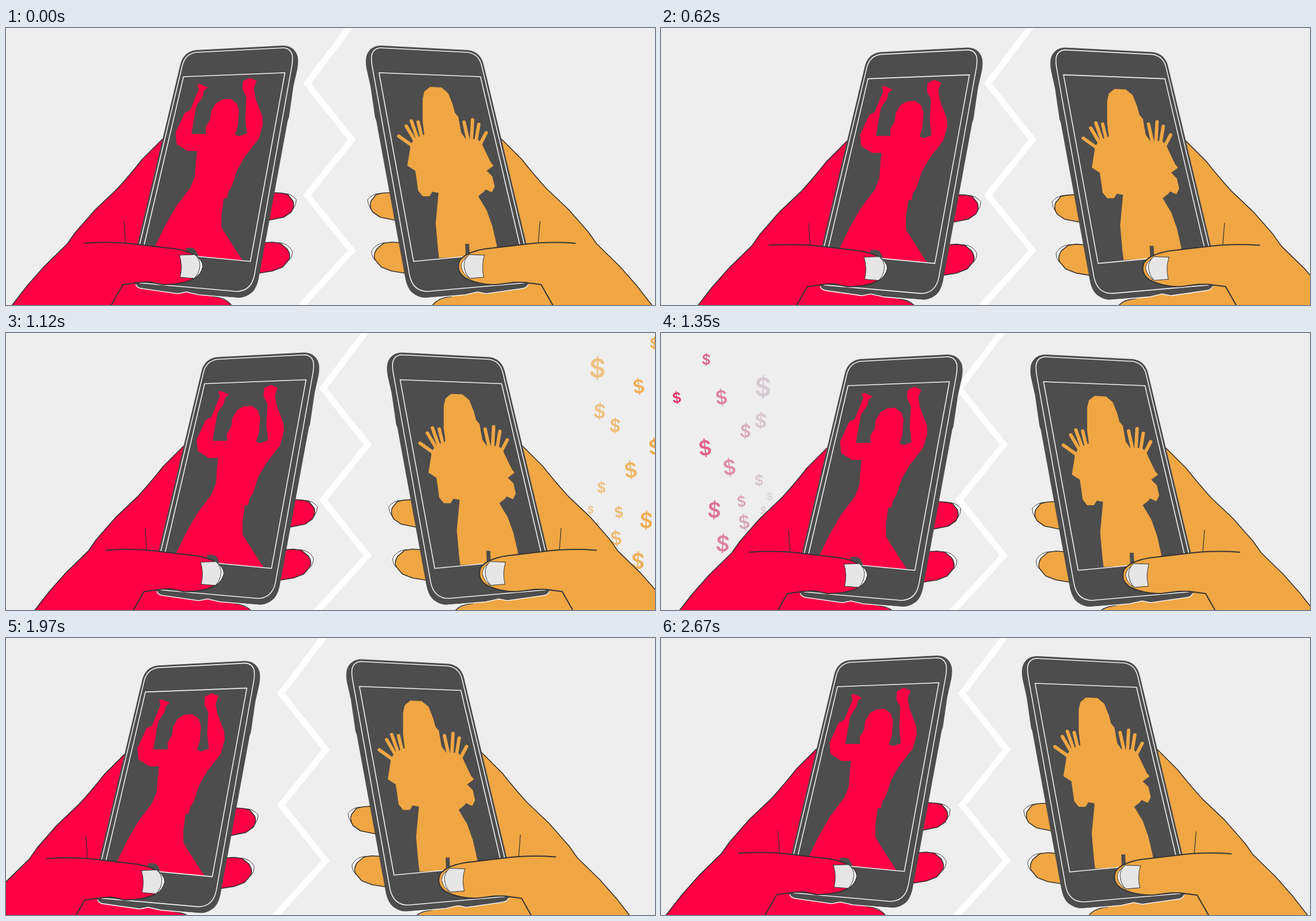
Write an HTML page with a canvas that moves like this. It is 1145 px wide and 489 px high and loops after 2710 ms.

```html
<!DOCTYPE html>
<html lang="en">
<head>
<meta charset="utf-8">
<style>
html, body { margin: 0; width: 100%; height: 100%; overflow: hidden; background: #eee; }
canvas { display: block; }
</style>
</head>
<body>
<canvas id="stage" width="1145" height="489"></canvas>
<script>
const ctx = document.getElementById('stage').getContext('2d');
const LOOP = 2710, MIRROR = 1150;
const RED = '#ff0044', ORANGE = '#f0a643', DARK = '#4d4d4d', INK = '#333', PALE = '#f2f2f2';
const path = d => new Path2D(d);

// Art is laid out for the left hand; the right hand is its mirror image.
const art = {
  edge: path('M276 196 L240 232 Q218 260 196 284 L157 321 L122 361 L108 381 L68 420 L38 454 L10 490'),
  palm: path('M276 196 L240 232 Q218 260 196 284 L157 321 L122 361 L108 381 L68 420 L38 454 L10 490 L398 490 Q390 480 365 473 Z'),
  pinky: path('M364 474 Q388 476 398 490'),
  fingers: path('M470 291 Q484 290 497 294 L506 305 Q510 315 503 325 L490 334 L460 340 M455 379 L470 378 L484 380 L496 390 Q503 401 499 409 L488 422 L470 429 L445 433'),
  tips: path('M490 292 Q503 292 512 303 Q512 312 506 320 Q509 305 497 294 Z M481 379 Q498 380 505 394 Q505 404 499 410 Q501 395 484 380 Z'),
  body: path('M307 66 Q312 42 335 39 L488 31 Q506 31 513 46 Q517 55 514 72 L509 94 L507 103 L499 158 L497 163 L446 440 Q442 462 431 469 Q420 477 408 476 L340 471 L318 466 L303 469 L238 460 Q225 458 228 440 L231 385 Z'),
  rim: path('M229 453 Q231 459 240 460 L303 469 L318 466 L340 471 L408 477'),
  bezel: path('M235 385 L311 66 Q316 46 335 43 L490 35 Q502 36 505 48 Q506 57 504 68 L438 437 Q432 465 406 465 L236 450'),
  screen: path('M313 86 L492 79 L431 412 L241 394 Z'),
  crease: path('M208 341 L211 379'),
  nail: path('M306 401 L333 400 Q343 409 342 420 Q341 433 332 442 L307 440 Q312 420 306 401 Z'),
  nailTip: path('M331 400 Q347 409 347 421 Q344 435 332 442 Q342 430 341 420 Q341 408 331 400 Z')
};

const dancer = {
  body: path(`M337 100 L342 99 L356 105 L349 111 L347 121 L336 137 L332 158 L327 187 L353 187 L352 175
    L360 162 L362 147 L370 133 L382 126 L396 125 L407 133 L411 146 L409 172 L404 188 L411 191 L425 186
    L422 160 L424 122 L417 108 L418 94 L430 88 L442 93 L437 107 L440 124 L452 156 L453 170 L446 195
    L422 226 L408 250 L398 280 L392 289 L390 300 L384 301 L380 330 L380 352 L400 384 L417 410
    L340 403 L334 391 L328 388 L318 388 L316 400 L255 395 L264 383 L280 350 L300 315 L325 282
    L333 262 L335 235 L337 217 L320 217 L301 205 L299 185 L315 150 L325 145 L335 120 L340 108 Z`),
  thumb: path('M139 380 Q190 376 240 383 L300 390 Q335 396 345 413 Q350 428 335 440 Q316 453 276 453 L253 448 L236 449 L206 453 L185 490')
};

const waver = {
  body: path(`M735 125 L738 112 L748 104 L768 105 L780 115 L788 135 L792 150 L798 157 L803 185 L811 196
    L832 196 L840 205 L843 212 L855 237 L860 243 L848 252 L858 262 L862 280 L857 290 L846 285
    L843 289 L833 297 L848 322 L858 350 L866 385 L860 400 L818 400 L817 381 L810 381 L811 404 L764 406
    L762 390 L758 345 L763 291 L752 289 L747 297 L735 297 L727 287 L724 265 L722 252 L708 243
    L713 212 L713 207 L721 195 L738 188 L735 165 Z`),
  fingers: path(`M693 191 L717 208 M706 173 L722 200 M715 164 L727 198 M727 166 L734 195
    M808 166 L815 198 M823 162 L821 198 M834 170 L829 200 M847 185 L836 206`),
  thumb: path('M146 380 Q195 376 245 383 L305 390 Q340 396 350 411 Q357 430 340 441 Q318 453 285 453 L253 449 L236 449 L206 453 L185 490')
};

const zigzag = path('M611 -8 L605 0 L531 98 L610 197 L531 295 L610 393 L522 489 L513 499');

// time, left x, left y, right x, right y, divider x
const keys = [
  [0, 0, 0, 0, 0, 0],
  [390, 45, 6.5, 45, 6.5, 29],
  [890, 49, 0, 49, 0, 53],
  [1350, 17, 7, 17, 7, -5],
  [1700, -37, 0, -37, 0, -37],
  [2170, -90, 20, -21, 14, -49],
  [2280, -114, 32, 7, 22, -48],
  [2450, -70, 19, 10, 13, -28],
  [2670, -2, 0, 2, 1, 0]
];

function keyAt(i) {
  const n = keys.length, wrap = Math.floor(i / n), k = keys[i - wrap * n];
  return [k[0] + wrap * LOOP, ...k.slice(1)];
}

// Smooth cubic curve through the looping keys.
function pose(t) {
  let i = keys.length - 1;
  while (keys[i][0] > t) i--;
  const [a, b, c, d] = [i - 1, i, i + 1, i + 2].map(keyAt);
  const span = c[0] - b[0], u = (t - b[0]) / span, u2 = u * u, u3 = u2 * u;
  return b.slice(1).map((p, j) => {
    const q = c[j + 1];
    const m = (q - a[j + 1]) / (c[0] - a[0]) * span;
    const n = (d[j + 1] - p) / (d[0] - b[0]) * span;
    return (2 * u3 - 3 * u2 + 1) * p + (u3 - 2 * u2 + u) * m + (3 * u2 - 2 * u3) * q + (u3 - u2) * n;
  });
}

// x, y, font size of each dollar sign at time BURST
const BURST = 1350, SPEED = 1.2, SOURCE = { x: 330, y: 215 };
const coins = [
  [81, 49, 25], [29, 116, 25], [108, 116, 33], [181, 99, 45], [150, 175, 31],
  [177, 157, 34], [79, 205, 36], [122, 239, 36], [174, 261, 25], [193, 289, 18],
  [95, 314, 37], [143, 298, 25], [148, 335, 32], [182, 314, 18], [110, 373, 38]
];
const clamp = v => Math.max(0, Math.min(1, v));

function drawCoins(t, right) {
  ctx.textAlign = 'center';
  ctx.textBaseline = 'middle';
  coins.forEach(([cx, cy, size], i) => {
    const x = cx - SPEED * (t - BURST);
    if (x > 275 || x < -40) return;
    const y = cy + (x - cx) * (cy - SOURCE.y) / (cx - SOURCE.x);
    const q = clamp((190 - x) / 165);
    const mix = (a, b) => Math.round(a + (b - a) * q);
    ctx.save();
    ctx.globalAlpha = right ? 0.45 + 0.55 * q : clamp((235 - x) / 45);
    ctx.fillStyle = right ? ORANGE : `rgb(${mix(212, 228)},${mix(212, 45)},${mix(217, 100)})`;
    ctx.translate(right ? 1180 - x : x, y);
    ctx.rotate([0.05, -0.12, -0.12, 0.02, 0.06][i % 5]);
    ctx.font = `600 ${size}px Inter, "Open Sans", sans-serif`;
    ctx.fillText('$', 0, 0);
    ctx.restore();
  });
}

function shape(p, fill, stroke, width = 1.6) {
  if (fill) { ctx.fillStyle = fill; ctx.fill(p); }
  if (stroke) { ctx.strokeStyle = stroke; ctx.lineWidth = width; ctx.stroke(p); }
}

function drawHand(x, y, color, figure, mirrored) {
  const flip = () => { if (mirrored) ctx.transform(-1, 0, 0, 1, MIRROR, 0); };
  ctx.save();
  ctx.translate(x, y);
  flip();
  shape(art.palm, color);
  shape(art.edge, null, INK);
  shape(art.pinky, null, INK);
  shape(art.tips, '#fff', INK, 1);
  shape(art.fingers, color, INK);
  shape(art.crease, null, INK, 1.2);
  shape(art.body, DARK);
  shape(art.rim, null, PALE);
  shape(art.bezel, null, PALE);
  flip();
  shape(figure.body, color);
  if (figure.fingers) shape(figure.fingers, null, color, 6);
  flip();
  shape(art.screen, null, PALE);
  shape(figure.thumb, color, INK, 2);
  shape(art.nailTip, '#fff', INK, 1);
  shape(art.nail, '#e6e6e6', INK, 1);
  ctx.restore();
}

function draw(now) {
  const t = now % LOOP;
  const [lx, ly, rx, ry, zx] = pose(t);
  ctx.fillStyle = '#eee';
  ctx.fillRect(0, 0, 1145, 489);
  ctx.lineCap = 'butt';
  ctx.lineJoin = 'miter';
  ctx.save();
  ctx.translate(zx, 0);
  shape(zigzag, null, '#fff', 11);
  ctx.restore();
  ctx.lineCap = ctx.lineJoin = 'round';
  drawCoins(t, false);
  drawCoins(t + 266, true);
  drawHand(lx, ly, RED, dancer, false);
  drawHand(rx, ry, ORANGE, waver, true);
}

const start = performance.now();
function tick() {
  draw(performance.now() - start);
  requestAnimationFrame(tick);
}
tick();
</script>
</body>
</html>
```
